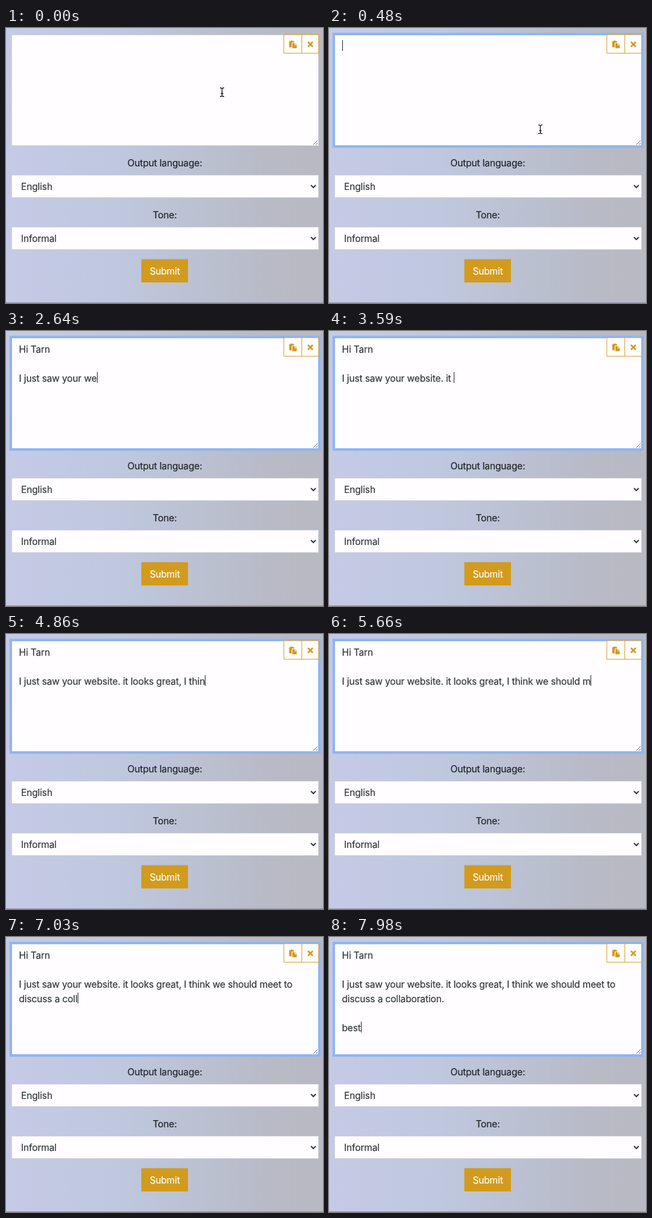
Recreate the animation shown at these times as an HTML page. Size 526x455 px, loop 8 s.

```html
<!DOCTYPE html>
<html lang="en">
<head>
<meta charset="utf-8">
<title>Message form</title>
<style>
  html, body { margin: 0; width: 100%; height: 100%; overflow: hidden; }
  body {
    position: relative;
    background: linear-gradient(90deg, #c5cae6, #bfc8df 34%, #bbc1d2 60%, #b8bac5 84%, #b8b9c2);
    color: #212529;
    font: 15.5px/24px Inter, "Open Sans", sans-serif;
    font-optical-sizing: none;
    letter-spacing: -.13px;
    -webkit-text-stroke: .2px;
  }
  body > * { position: absolute; box-sizing: border-box; }
  .field { left: 9px; width: 510px; background: #fffdff; border: 1px solid #ced4da; color: #30363b; }
  #message { top: 11px; height: 184px; padding: 7px 11.5px; white-space: pre; }
  #message.focus { border-color: #86b5f8; box-shadow: 0 0 0 3.2px #92b5ee; }
  #caret { position: relative; }
  #caret::after { content: ""; position: absolute; left: 0; top: -1px; width: 1px; height: 18px; background: #222; }
  .select { height: 38px; padding: 7px 15px; }
  .label { left: 0; width: 527px; text-align: center; }
  #submit { left: 225px; top: 384px; width: 77px; line-height: 38px; text-align: center; color: #fff; }
  #footer { left: 0; top: 454px; width: 100%; height: 1px; background: #8d92a6; }
  svg { left: 0; top: 0; }
</style>
</head>
<body>
<div id="message" class="field"><span id="typed"></span><span id="caret">&#8203;</span></div>
<div class="label" style="top:212px">Output language:</div>
<div class="field select" style="top:243px">English</div>
<div class="label" style="top:298px">Tone:</div>
<div class="field select" style="top:329px">Informal</div>
<div id="footer"></div>

<svg width="526" height="455" fill="none">
  <g fill="#d29b1e">
    <rect x="224.5" y="382.5" width="77.5" height="38.5"/>
    <path stroke="#d29b1e" fill="#fffdff" d="M461 11h57.8v30.8H461zM490.800 11v30.800"/>
    <!-- paste and clear icons -->
    <path d="M470 22.500q0-1 1-1h1.500a1.600 1.600 0 0 1 3 0H477q1 0 1 1V24h-2.500q-1.500 0-1.500 1.500V32h-3q-1 0-1-1zM475 26q0-1 1-1h3v3.500h3.500V32.500q0 1-1 1H476q-1 0-1-1zM480 25l2.500 2.500H480z"/>
    <path stroke="#d29b1e" stroke-width="2.600" d="M501 23l8 8M509 23l-8 8"/>
  </g>
  <path stroke="#666" d="M510 193l7-7M514 193l3-3"/>
  <path stroke="#343a40" stroke-width="2" d="M506 260l4 4 4-4M506 346l4 4 4-4"/>
  <path id="pointer" stroke="#111" stroke-width="1.300" d="M-3.500-7q3 0 3.500 1.500q.5-1.500 3.500-1.500M0-6V7M-3.500 7.500q3 0 3.500-1.500q.5 1.500 3.500 1.500M-2 2.500h4"/>
</svg>
<div id="submit">Submit</div>

<script>
const LOOP = 8000, KEY_DELAY = 55, FOCUS_AT = 200, POINTER_HIDES_AT = 850;

// Bursts of steady typing, each with its start time
const PHRASES = [
  [900, "Hi Tarn\n\nI"],
  [1640, " just saw your we"],
  [2800, "bsite."],
  [3370, " it "],
  [3750, "looks great, I thin"],
  [4900, "k we should meet to\n"],
  [6070, "discuss a "],
  [6765, "collaboration."],
  [7645, "\n\nbest"]
];

const [message, typed, caret, pointer] =
  ["message", "typed", "caret", "pointer"].map(id => document.getElementById(id));

const textAt = time => PHRASES.map(([start, text]) =>
  text.slice(0, Math.max(0, Math.floor((time - start) / KEY_DELAY)))).join("");

function draw(time) {
  const focused = time >= FOCUS_AT;
  message.classList.toggle("focus", focused);
  caret.hidden = !focused;
  typed.textContent = textAt(time);

  const p = Math.min(1, Math.max(0, (time - 250) / 450));
  const ease = p * p * (3 - 2 * p);
  pointer.setAttribute("transform", `translate(${358.5 - 15 * ease} ${106 + 118 * ease})`);
  pointer.style.display = time < POINTER_HIDES_AT ? "" : "none";
}

const start = performance.now();
function tick() {
  draw((performance.now() - start) % LOOP);
  requestAnimationFrame(tick);
}
tick();
</script>
</body>
</html>
```
